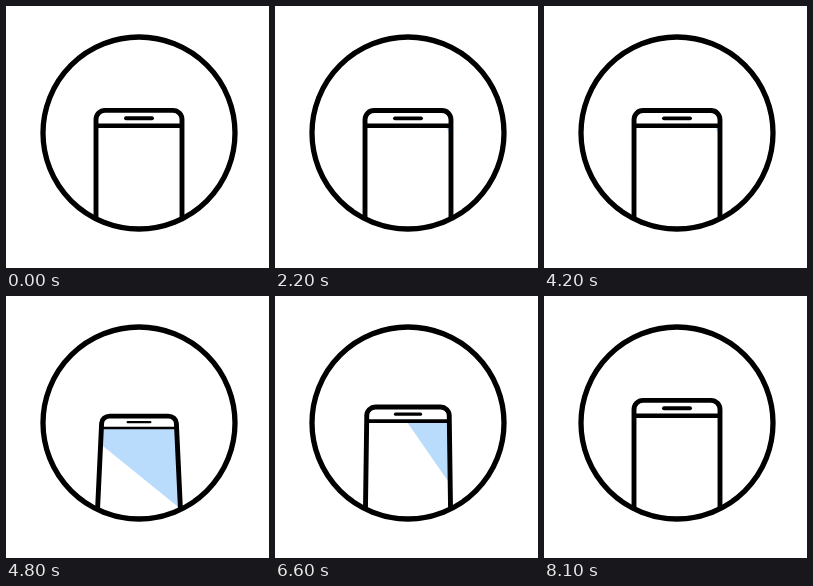
Write an HTML page that moves like this. It is 263 px wide and 262 px high and loops after 8.2 s.

```html
<!DOCTYPE html>
<html lang="en">
<head>
<meta charset="utf-8">
<title>Tilting phone</title>
<style>
  html, body { margin: 0; width: 100%; height: 100%; overflow: hidden; background: #fff; }
  svg { display: block; width: 100vw; height: 100vh; }
</style>
</head>
<body>
<svg viewBox="0 0 263 262" fill="none" stroke="#000">
  <defs>
    <clipPath id="disc"><circle cx="133" cy="127" r="96"/></clipPath>
    <clipPath id="glass"><path id="screen"/></clipPath>
  </defs>
  <g clip-path="url(#disc)">
    <path id="glare" fill="#badcfc" stroke="none" clip-path="url(#glass)"/>
    <path id="body" stroke-width="4.9"/>
    <path id="divider"/>
    <path id="speaker" stroke-linecap="round"/>
  </g>
  <circle cx="133" cy="127" r="96" stroke-width="5.3"/>
</svg>
<script>
const LOOP = 8200, STEP = 100, CYCLE = 2000, PEAK = 1200;
const MAX_DROP = 22;
const CENTER = 133, PIVOT = 246, TOP = 104.4, BAR = 119.7, HALF = 43, RADIUS = 9;
const HEIGHT = PIVOT - TOP;
const el = id => document.getElementById(id);
const [screenPath, glare, body, divider, speaker] =
  ['screen', 'glare', 'body', 'divider', 'speaker'].map(el);

// Smooth ease that reaches one half at `mid`
function ease(p, mid, power) {
  if (p < mid) return 0.5 * (p / mid) ** power;
  return 1 - 0.5 * ((1 - p) / (1 - mid)) ** (power * (1 - mid) / mid);
}

function dropAt(ms) {
  const t = ms % CYCLE;
  const tilt = t < PEAK
    ? ease(t / PEAK, 0.58, 3.4)
    : 1 - ease((t - PEAK) / (CYCLE - PEAK), 0.505, 4);
  return MAX_DROP * tilt;
}

// Perspective map that lowers the top edge by `drop`
function projector(drop) {
  const shrink = 0.0045 * drop + 0.00036 * drop * drop;
  const stretch = (HEIGHT - drop) * (1 + shrink) / HEIGHT;
  return (u, v) => {
    const w = 1 + shrink * (PIVOT - v) / HEIGHT;
    return [CENTER + u / w, PIVOT - (PIVOT - v) * stretch / w];
  };
}

function draw(ms) {
  const drop = dropAt(ms);
  const project = projector(drop);
  const at = (u, v) => project(u, v).map(n => n.toFixed(2)).join(' ');
  const set = (node, d) => node.setAttribute('d', d);
  const inner = HALF - RADIUS, shoulder = TOP + RADIUS, base = 240;

  set(body, `M${at(-HALF, base)}L${at(-HALF, shoulder)}` +
    `C${at(-HALF, TOP + 4)} ${at(4 - HALF, TOP)} ${at(-inner, TOP)}L${at(inner, TOP)}` +
    `C${at(HALF - 4, TOP)} ${at(HALF, TOP + 4)} ${at(HALF, shoulder)}L${at(HALF, base)}`);
  set(divider, `M${at(-HALF, BAR)}L${at(HALF, BAR)}`);
  set(speaker, `M${at(-13, 112.2)}L${at(13, 112.2)}`);
  set(screenPath, `M${at(-HALF, BAR)}L${at(HALF, BAR)}L${at(HALF, base)}L${at(-HALF, base)}Z`);
  divider.setAttribute('stroke-width', 4.6 - 0.13 * drop);
  speaker.setAttribute('stroke-width', 3.9 - 0.1 * drop);

  // The glare edge sweeps out from the upper right corner
  const [right, y] = project(HALF, BAR);
  const left = right - 5.8 * drop - 4.5 * Math.min(1, 6 * drop);
  const reach = Math.min(drop, 14.5);
  const low = 130 + 11.6 * reach - 0.4 * reach * reach;
  set(glare, drop > 0.05 ? `M${left} ${y}H176V${low}Z` : '');
}

const start = performance.now();
function tick() {
  const ms = (performance.now() - start) % LOOP;
  draw(Math.floor(ms / STEP) * STEP);
  requestAnimationFrame(tick);
}
tick();
</script>
</body>
</html>
```
